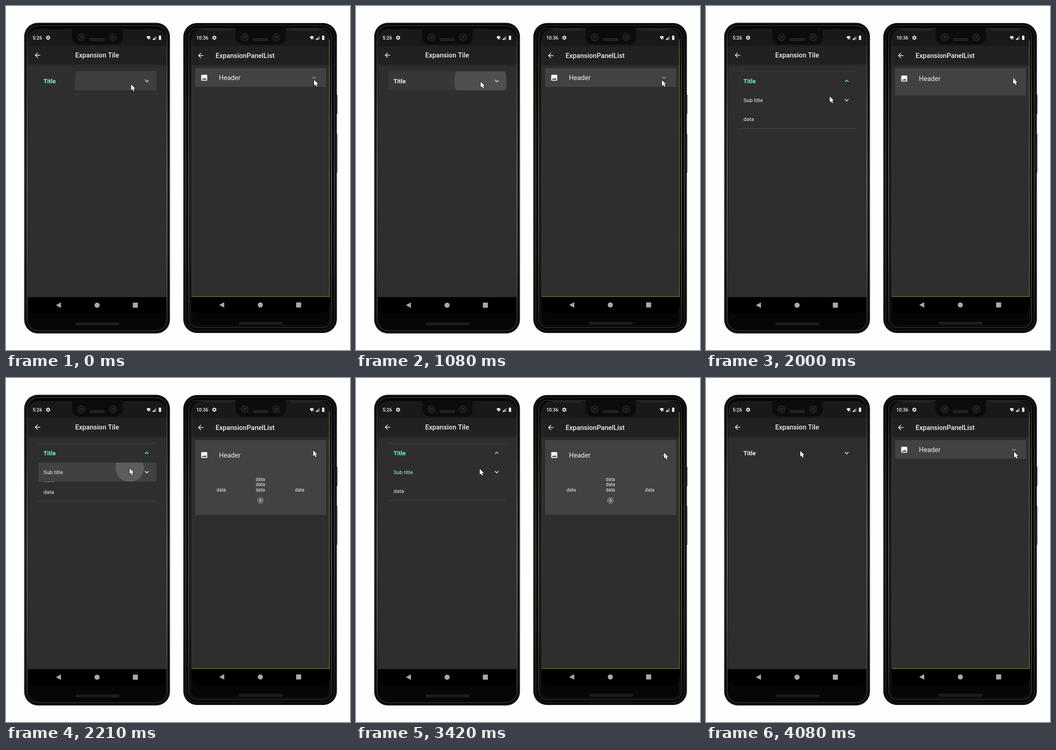
An HTML page with a canvas for the animation above (4210 ms loop, 748 by 748 pixels).

```html
<!DOCTYPE html>
<html>
<head>
<meta charset="utf-8">
<style>
html, body { margin: 0; height: 100%; overflow: hidden; background: #fefefe; }
canvas { display: block; }
</style>
</head>
<body>
<canvas id="stage" width="748" height="748"></canvas>
<script>
const ctx = document.getElementById('stage').getContext('2d');
const LOOP = 4210, FRAMES = 42, ROW = 41.5;

const icon = {
  gear: new Path2D('M19.4 13a7 7 0 0 0 0-2l2.1-1.6-2-3.5-2.5 1a7 7 0 0 0-1.7-1L15 3.2h-4l-.4 2.7a7 7 0 0 0-1.7 1l-2.5-1-2 3.5L6.5 11a7 7 0 0 0 0 2l-2.1 1.6 2 3.5 2.5-1a7 7 0 0 0 1.7 1l.4 2.7h4l.4-2.7a7 7 0 0 0 1.7-1l2.5 1 2-3.5zM13 15.4a3.4 3.4 0 1 1 0-6.8 3.4 3.4 0 0 1 0 6.8z'),
  back: new Path2D('M20 11H7.83l5.59-5.59L12 4l-8 8 8 8 1.41-1.41L7.83 13H20z'),
  image: new Path2D('M21 19V5c0-1.1-.9-2-2-2H5c-1.1 0-2 .9-2 2v14c0 1.1.9 2 2 2h14c1.1 0 2-.9 2-2zM8.5 13.5l2.5 3.01L14.5 12l4.5 6H5z'),
  chevron: new Path2D('M16.59 8.59L12 13.17 7.41 8.59 6 10l6 6 6-6z'),
  wifi: new Path2D('M2 8Q12 0 22 8L18 12H14V18L12 21ZM15 14l1.2-1.2 2 2 2-2 1.2 1.2-2 2 2 2-1.2 1.2-2-2-2 2L15 18l2-2z'),
  cursor: new Path2D('M0 0V12.6L2.9 10L5 14.7L7.2 13.7L5.1 9.2H9Z')
};

// Piecewise linear value through [time, value, time, value, ...]
function track(t, keys) {
  if (t <= keys[0]) return keys[1];
  for (let i = 2; i < keys.length; i += 2) {
    if (t < keys[i]) {
      const f = (t - keys[i - 2]) / (keys[i] - keys[i - 2]);
      return keys[i - 1] + f * (keys[i + 1] - keys[i - 1]);
    }
  }
  return keys[keys.length - 1];
}

const titleOpen = t => track(t, [-180, 1, 80, 0, 1050, 0, 1250, 1, 3720, 1, 3920, 0]);
const subOpen = t => track(t, [2165, 0, 2365, 1, 3200, 1, 3400, 0]);
const panelOpen = t => track(t, [1950, 0, 2150, 1, 3430, 1, 3630, 0]);
const easeIn = v => v * v;
const easeInOut = v => v * v * (3 - 2 * v);

const mint = v => {
  const mix = (a, b) => Math.round(a + (b - a) * v);
  return `rgb(${mix(240, 108)},${mix(240, 246)},${mix(240, 207)})`;
};
const white = a => `rgba(255,255,255,${a})`;

function rect(x, y, w, h, fill, r = 0) {
  ctx.fillStyle = fill;
  ctx.beginPath();
  ctx.roundRect(x, y, w, h, r);
  ctx.fill();
}
function disc(x, y, r, fill) {
  ctx.fillStyle = fill;
  ctx.beginPath();
  ctx.arc(x, y, r, 0, 7);
  ctx.fill();
}
function text(str, x, y, size, fill = '#f0f0f0', weight = 400, align = 'left') {
  ctx.font = `${weight} ${size}px Roboto, sans-serif`;
  ctx.textAlign = align;
  ctx.fillStyle = fill;
  ctx.fillText(str, x, y);
}
function glyph(path, x, y, scale, fill = '#f4f4f4', turn = 0) {
  ctx.save();
  ctx.translate(x, y);
  ctx.rotate(turn);
  ctx.scale(scale, scale);
  ctx.translate(-12, -12);
  ctx.fillStyle = fill;
  ctx.fill(path, 'evenodd');
  ctx.restore();
}
function clipped(x, y, w, h, draw) {
  if (h <= 0) return;
  ctx.save();
  ctx.beginPath();
  ctx.rect(x, y, w, h);
  ctx.clip();
  draw();
  ctx.restore();
}

// Black body with metallic rings, each given as [inset, grey, width]
function shell(x, y, w, h, rings) {
  rect(x, y, w, h, '#060606', 30);
  for (const [inset, grey, width] of rings) {
    const g = ctx.createLinearGradient(0, y, 0, y + h);
    [0.3, 0.75, 1, 0.8, 0.3].forEach((a, i) =>
      g.addColorStop(i / 4, `rgba(${grey},${grey},${grey},${a})`));
    ctx.strokeStyle = g;
    ctx.lineWidth = width;
    ctx.beginPath();
    ctx.roundRect(x + inset, y + inset, w - 2 * inset, h - 2 * inset, 30 - inset);
    ctx.stroke();
  }
}

function screen({ clock, clockX, gearX, heading, headingX, headingY, left, barEnd, navY }) {
  const w = 349 - left;
  rect(left, 50, w, 40, '#191919', [22, 22, 0, 0]);
  rect(left, 87, w, barEnd - 87, '#212121');
  rect(left, barEnd, w, 633 - barEnd, '#2e2e2e');
  const shade = ctx.createLinearGradient(0, barEnd, 0, barEnd + 5);
  shade.addColorStop(0, 'rgba(0,0,0,.18)');
  shade.addColorStop(1, 'rgba(0,0,0,0)');
  rect(left, barEnd, w, 5, shade);
  rect(left, 633, w, 36, '#000', [0, 0, 20, 20]);

  // Notch with cameras and speaker
  rect(144, 48, 110, 36, '#0c0c0c', [0, 0, 16, 16]);
  for (const x of [164, 232.5]) {
    disc(x, 68, 8.5, '#242424');
    disc(x, 68, 6.5, '#151515');
    disc(x, 68, 3, '#22221d');
    disc(x + 1.5, 66.5, 1, '#4a4a40');
  }
  rect(182, 70, 33, 6, '#292929', 3);
  for (let x = 184; x < 213; x += 3) rect(x, 71.5, 1.4, 3, '#111');

  text(clock, clockX, 73, 10.3, '#f2f2f2', 500);
  glyph(icon.gear, gearX, 69, 0.54);
  glyph(icon.wifi, 310, 69, 0.46);
  ctx.fillStyle = '#777';
  ctx.fill(new Path2D('M318 73.5H327V64.5Z'));
  ctx.fillStyle = '#eee';
  ctx.fill(new Path2D('M318 73.5H323V68.5Z'));
  rect(332.3, 65, 5, 8.8, '#f4f4f4', 0.8);
  rect(333.6, 64, 2.4, 2, '#f4f4f4');

  glyph(icon.back, 68.5, headingY - 5.3, 0.73);
  text(heading, headingX, headingY, 14.6, '#f2f2f2', 500);

  ctx.save();
  ctx.translate(0, navY);
  ctx.fillStyle = '#a9a9a9';
  ctx.fill(new Path2D('M108.5 0L119.5 -6V6Z'));
  disc(198, 0, 5.6, '#a9a9a9');
  rect(275.8, -5.5, 11, 11, '#a9a9a9', 1);
  ctx.restore();
}

function ripple(t, start, x, y, top) {
  const age = t - start;
  if (age <= 0 || age > 320) return;
  const fade = Math.min(1, 1 - (age - 100) / 220);
  clipped(70, top, 257, ROW, () => {
    rect(70, top, 257, ROW, white(0.09 * fade ** 3));
    disc(x, y, 31 * (age / 100) ** 1.5, white((age > 200 ? 0.22 : 0.15) * fade));
  });
}

function tiles(t) {
  const open1 = titleOpen(t), open2 = subOpen(t);
  const extra = ROW * easeIn(open2);
  const full = 2 * ROW + extra, height = full * easeIn(open1);
  const top = 183.5;
  const line = (y, alpha) => rect(70, y - 0.5, 257, 1, white(0.11 * alpha));

  line(142, open1);
  line(top + height, open1);
  ripple(t, -250, 272, 170, 142);
  ripple(t, 950, 271, 164, 142);
  ripple(t, 3640, 205, 158, 142);
  text('Title', 81.5, 167.7, 13.1, mint(easeIn(titleOpen(t - 140))), 700);
  glyph(icon.chevron, 306, 163, 0.73, mint(easeIn(open1)), Math.PI * easeIn(open1));

  clipped(47, top, 302, height, () => {
    ctx.translate(0, (height - full) / 2);
    line(184, open2);
    line(225 + extra, open2);
    ripple(t, 2100, 269, 195, 183.7);
    ripple(t, 3070, 269, 197, 183.7);
    text('Sub title', 81.5, 208.8, 11.7, mint(easeIn(subOpen(t - 150))));
    glyph(icon.chevron, 306, 204.5, 0.73, mint(easeIn(open2)), Math.PI * easeIn(open2));
    text('data', 81.5, 250.3 + extra, 11.7);
    clipped(47, 225, 302, extra, () => text('data', 81.5, 250 + (extra - ROW) / 2, 11.7));
  });
}

function panel(t) {
  const open = easeInOut(panelOpen(t));
  const height = 41 + 122 * open, mid = 156 + 11.5 * open;
  ctx.save();
  ctx.shadowColor = 'rgba(0,0,0,.2)';
  ctx.shadowBlur = 2;
  rect(411, 135, 285, height, '#424242', 1);
  ctx.restore();
  glyph(icon.image, 431, mid, 0.73);
  text('Header', 463, mid + 5, 14.6);
  glyph(icon.chevron, 670, mid, 0.73, '#9a9a9a', Math.PI * open);
  clipped(411, 135, 285, height, () => {
    ctx.translate(0, 23 * (open - 1));
    ctx.globalAlpha = Math.max(0, (open - 0.4) / 0.6);
    const cell = (x, y) => text('data', x, y, 10.2, '#f0f0f0', 400, 'center');
    for (const y of [223.5, 235.3, 247]) cell(553.3, y);
    cell(468, 247);
    cell(638.5, 247);
    ctx.strokeStyle = '#989898';
    ctx.lineWidth = 1.4;
    ctx.beginPath();
    ctx.arc(553.3, 266.3, 6.1, 0, 7);
    ctx.stroke();
    disc(553.3, 266.3, 3.5, '#989898');
  });
}

function cursor(x, y) {
  ctx.save();
  ctx.translate(x, y + 0.5);
  ctx.lineWidth = 1.4;
  ctx.strokeStyle = '#111';
  ctx.stroke(icon.cursor);
  ctx.fillStyle = '#fff';
  ctx.fill(icon.cursor);
  ctx.restore();
}

function leftPhone(t) {
  shell(39.5, 36.5, 317, 675.5, [[1.8, 75, 1.6], [6.3, 150, 1.6]]);
  rect(151, 688, 96, 6.5, '#1c1c1c', 3);
  screen({
    clock: '5:26', clockX: 58, gearX: 91, heading: 'Expansion Tile',
    headingX: 150.5, headingY: 112.3, left: 47.5, barEnd: 127, navY: 650.5
  });
  tiles(t);
  cursor(
    track(t, [0, 272, 700, 271, 1500, 271, 1950, 269, 3440, 269, 3640, 205]),
    track(t, [0, 170, 700, 164, 1500, 164, 1950, 196, 2200, 196, 2600, 200, 3000, 200, 3300, 197, 3440, 197, 3640, 158])
  );
}

function rightPhone(t) {
  rect(717, 193, 3.5, 42, '#2c2c2c', 1);
  rect(717, 278, 3.5, 85, '#4a4a4a', 1);
  shell(385.5, 37, 334, 674, [[1.8, 55, 1.4], [5.5, 95, 1.4], [12, 135, 1.5], [16, 70, 1]]);
  rect(506, 686.5, 96, 6.5, '#1c1c1c', 3);
  ctx.save();
  ctx.translate(355, 0);
  screen({
    clock: '10:36', clockX: 58.7, gearX: 97.5, heading: 'ExpansionPanelList',
    headingX: 100.7, headingY: 113, left: 48.5, barEnd: 128, navY: 650
  });
  ctx.restore();
  rect(702.5, 73, 1.3, 559, '#5c8420');
  rect(404, 631, 299.5, 1.3, '#5c8420');
  rect(403.5, 75, 0.8, 557, '#3f5420');
  rect(428, 51.5, 62, 0.8, '#3f5420');
  rect(618, 51.5, 62, 0.8, '#3f5420');
  panel(t);
  cursor(
    track(t, [100, 670, 600, 658, 900, 658, 1200, 669, 2100, 668, 3000, 668, 3300, 670]),
    track(t, [100, 160, 600, 170, 900, 170, 1200, 156, 2600, 157, 3000, 157, 3300, 162, 3500, 162, 3600, 160])
  );
}

function render() {
  const step = Math.floor((performance.now() % LOOP + 30) * FRAMES / LOOP);
  const t = Math.min(step, FRAMES - 1) * 100;
  ctx.clearRect(0, 0, 748, 748);
  leftPhone(t);
  rightPhone(t);
  requestAnimationFrame(render);
}
render();
</script>
</body>
</html>
```
